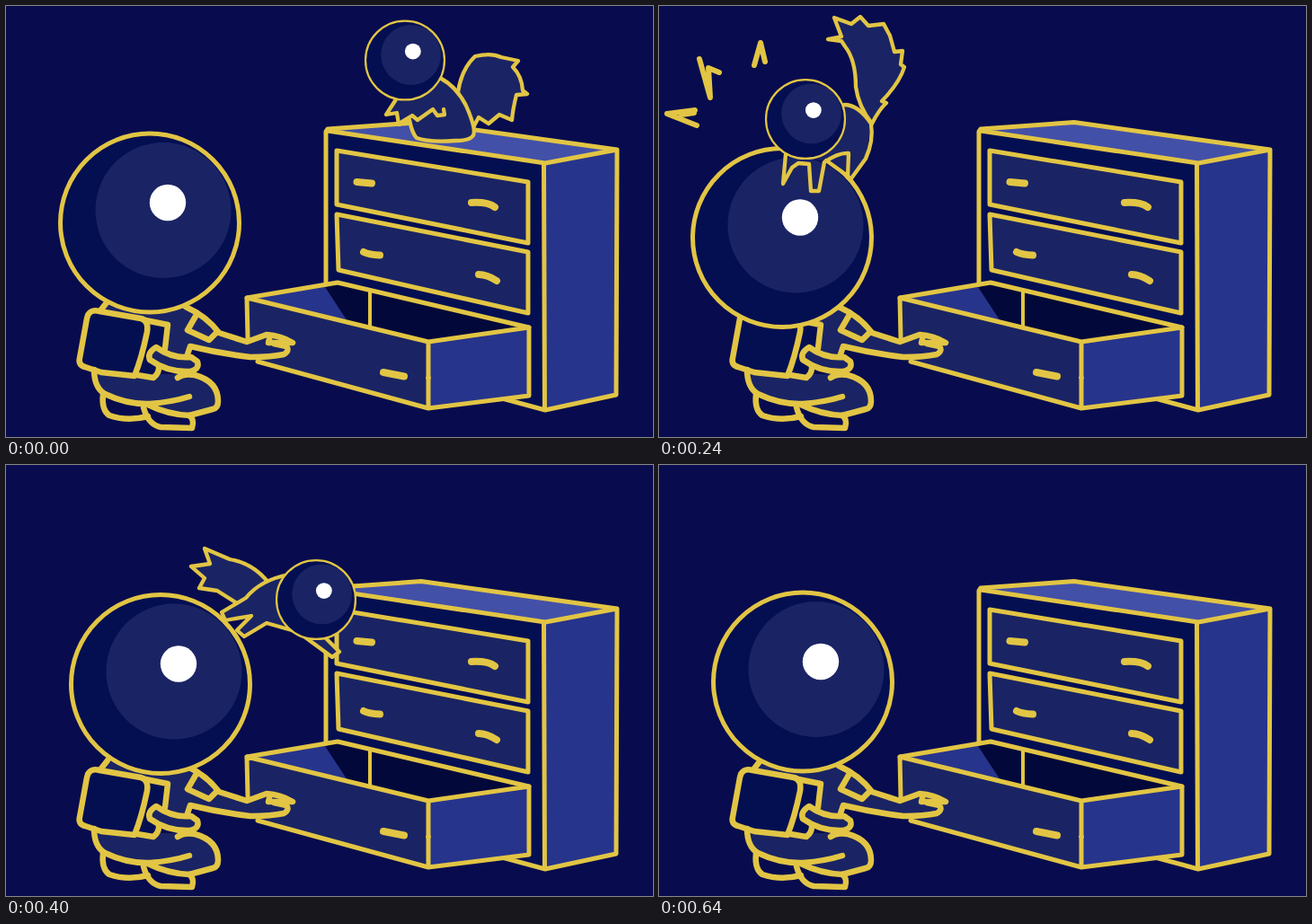
An HTML page that plays this animation: 720x480 px, repeating every 0.72 s.

```html
<!DOCTYPE html>
<html lang="en">
<head>
<meta charset="utf-8">
<title>Squirrel and dresser</title>
<style>
html, body { margin: 0; width: 100%; height: 100%; overflow: hidden; background: #080c4e; }
svg { display: block; width: 720px; height: 480px; }
.line { fill: none; stroke: #e2c544; stroke-linecap: round; stroke-linejoin: round; }
.night { fill: #040f52; }
.mid { fill: #1a2464; }
.side { fill: #27348c; }
.top { fill: #4350a8; }
.dark { fill: #020839; }
</style>
</head>
<body>
<svg viewBox="0 0 720 480">
  <defs>
    <g id="globe">
      <circle class="night" r="99.5"/>
      <circle class="mid" cx="15" cy="-14" r="75.5"/>
      <circle fill="#fff" cx="20" cy="-22.5" r="20.2"/>
      <circle class="line" r="99.5" stroke-width="5"/>
    </g>
  </defs>
  <rect width="720" height="480" fill="#080c4e"/>

  <g id="dresser">
    <path class="night" d="M356 139L600 175V450L552 437L356 400Z"/>
    <path class="top" d="M358 137L462 129L680 160L600 175Z"/>
    <path class="side" d="M599 175L680 160L679 433L600 450Z"/>
    <path class="mid" d="M368 161L581 196V264L368 221ZM368 231L581 274V342L370 294Z"/>
    <path class="side" d="M268 325L356 312L382 352Z"/>
    <path class="dark" d="M355 313L369 308L582 358L470 374L380 351Z"/>
    <g class="line" stroke-width="5">
      <path d="M356 310V140L358 137L462 129.500L680 160L679 433L600 450L552 437M358 139L600 175L680 160M598.500 175L599.500 450"/>
      <path d="M368 161L581 196V264L368 221ZM368 232L581 274V342L370 294Z"/>
      <path d="M268 325L369 308L582 358" />
      <path d="M405 318V357" stroke-width="4"/>
    </g>
    <path class="line" stroke-width="8" d="M390.500 196L407 197.500M518 219Q536 218 544 224M398 274Q404 277 416 277.500M526 299Q535 299 546 306"/>
  </g>

  <g id="inside"></g>

  <g id="drawer">
    <path class="mid" d="M268 325L470 374V448L280 396L269 370Z"/>
    <path class="side" d="M470 374L582 358V434L470 448Z"/>
    <path class="line" stroke-width="5" d="M269 370L268 325L470 374V448L280 396M470 374L582 358V434L470 448M469.500 414H470.500"/>
    <path class="line" stroke-width="8" d="M420 408L443 412.500"/>
  </g>

  <g id="body">
    <path class="mid" d="M112 330L104 341L160 352L180 356L168 384L200 392L205 380L270 390L310 388L316 380L290 367L268 375L237 364Q220 342 200 334Z"/>
    <path class="mid" d="M98 405Q98 425 110 432Q135 444 160 443Q180 455 204 456L230 449Q236 448 236 440Q236 418 210 410L165 410Z"/>
    <path class="night" d="M96 340L82 392Q80 399 88 402L106 408L143 412L165 414Q180 370 180 355Z"/>
    <g class="line" stroke-width="6.500">
      <path d="M113 329L106 338M200 335Q224 346 237 364L268 374L290 366Q306 367 319 375L292 375L293 371M298 376L312 379Q316 384 309 388Q295 391 272 391Q238 387 205 379L201 391"/>
      <path d="M213 342L202 361L226 372L235 363"/>
      <path d="M104 340Q92 337 90 348L82 392Q80 400 88 402L106 408L143 412Q151 392 157 363Q159 350 150 348Z"/>
      <path d="M155 350L180 355L177 381M146 411L164 414Q171 409 170 400"/>
      <path class="mid" d="M167 380Q157 386 160 394Q180 408 204 407Q216 405 213 396L206 391Q185 393 167 380Z"/>
      <path d="M98 405Q98 425 110 432Q135 444 160 443Q185 441 204 435M191 414Q198 409 210 411Q236 418 236 440Q236 448 230 449L204 456Q180 455 158 444"/>
      <path d="M108 432Q106 450 115 456Q135 463 158 457M153 447Q158 466 172 469L207 470Q210 460 204 456"/>
    </g>
  </g>

  <use id="head" href="#globe"/>
  <g id="outside"></g>
  <path id="marks" class="line" stroke-width="6"/>
</svg>
<script>
const STEP = 80, LOOP = 720, REST = [160, 241.5];
const $ = id => document.getElementById(id);

// Parts stack in order: tail, body, line details, face.
const leapTail = "M48 -12Q66 -40 96 -45L124 -57L118 -40L139 -37L124 -24L130 -13L110 -10L88 4L60 8";
const leapBody = "M30 -28Q62 -22 78 -2L105 14L101 23L72 18L88 34L80 41L55 26L20 36L-18 64L-26 58L0 32Z";

const poses = [
  { face: [444, 60.5],
    tail: "M503 96Q507 70 522 56Q540 52 551 57L570 61L564 68Q574 78 575 94L580 98L568 99Q564 115 563 127L549 121L537 131L526 124L519 137",
    body: "M483 80Q505 92 515 118Q523 138 520 144Q517 150 500 150Q470 152 457 147Q452 142 449 127L437 132L435 119L423 121L434 104",
    detail: "M437 131L452 122L458 127L475 115L480 122L488 121L487 115" },
  { face: [296, 72], at: [296, 72], tail: leapTail, body: leapBody },
  { head: [141.5, 249], face: [171.5, 118],
    tail: "M229 116Q232 90 255 65Q275 45 292 40L304 26V54L335 49Q330 60 318 72L320 80L310 86L302 95L295 97L303 100Q290 110 279 117L275 122L254 131",
    body: "M215 117Q228 113 243 118Q255 130 251 155Q248 172 232 186L226 195",
    fill: "M215 117L243 118L251 155L226 196L206 174L153 178L145 152Z",
    detail: "M138 154L150 160L153 178L160 165L177 178L183 170L187 175L203 168L207 174L219 156L217 151M152 178L143 178L133 189L142 193L157 177M177 173L165 195L176 198L189 177M207 173L217 165L226 168L222 180L211 181",
    marks: "M122 91L114 87L111 79Q105 90 95 93L75 93Q80 100 77 122L62 126L51 125Q66 128 69 145L68 164" },
  { head: [137, 258], face: [163, 126],
    tail: "M237 131Q222 112 219 90Q219 60 207 45L203 39L188 37L203 34L195 13L214 20L224 12L233 22L250 20L257 33L262 51L271 50L269 65L273 68Q268 85 248 106L253 108Q245 115 237 131",
    body: "M206 110Q222 110 236 131Q239 150 230 170L214 192",
    fill: "M206 110L222 113L236 131L230 170L213 193L186 173L141 165Z",
    detail: "M141 165L138 198L148 180L155 175L167 176L169 206H178L184 174Q200 163 211 164L210 191M186 172L211 190",
    marks: "M40 116L9 120L42 133M25 121L39 119M45 59L57 102L55 69L67 74M106 66L113 41L118 62" },
  { head: [185, 249], face: [239.5, 72.5],
    tail: "M200 52L170 60L181 71L164 88L182 87L183 96L200 95",
    body: "M282 58Q305 64 311 88Q313 108 307 118L294 132L283 154L264 178L253 168L215 157L189 147L204 130L193 117L207 101",
    fill: "M282 58Q305 64 311 88L294 132L264 178L189 147L207 101Z",
    hollow: true,
    detail: "M282 58Q305 64 311 88Q313 108 307 118L295 131M283 86Q295 95 297 115Q297 130 283 152L264 178M207 101L193 117L201 118L206 130L189 147L197 150L214 135M220 134L205 150L214 153L228 137M233 138L215 157L233 159L246 138M257 137L241 160L252 167L270 136M206 130L222 134L226 117L240 131L250 122L257 133L273 112" },
  { head: [172, 244], face: [345, 150], at: [345, 150], flip: true, tail: leapTail, body: leapBody },
  { face: [427, 289.5], sunk: true,
    body: "M321 201L334 196Q336 215 352 239L378 234L375 190L383 190Q385 218 404 248L462 322Q430 342 397 333Q374 326 366 304L374 300L352 265Q345 232 321 201Z",
    detail: "M352 239L368 264Q378 262 388 265M366 262L368 272L359 275L374 295L367 305M407 339L413 359L425 361L420 337M440 336L455 365L467 363L452 332" },
  { sunk: true,
    tail: "M391 350Q386 318 374 300L361 285L376 285L374 267L389 277L401 262L408 280L421 279L418 296L426 307Q417 328 421 358" },
  {}
];

const stroke = (d, cls = "") => d ? `<path class="line ${cls}" stroke-width="4.300" d="${d}"/>` : "";

function squirrel({ face, at, flip, tail, body, fill, hollow, detail }) {
  const move = at ? ` transform="translate(${at}) scale(${flip ? -1 : 1} 1)"` : "";
  const filled = d => d ? `<path class="mid" d="${d}"/>` : "";
  const coat = fill
    ? filled(fill) + (hollow ? "" : stroke(body))
    : filled(body) + stroke(body);
  const ball = face ? `<use href="#globe" transform="translate(${face}) scale(.442)"/>` : "";
  return `<g${move}>${filled(tail)}${stroke(tail)}${coat}${stroke(detail)}</g>${ball}`;
}

const drawings = poses.map(squirrel);
let shown = -1;

function draw(ms) {
  const i = Math.floor((ms % LOOP) / STEP);
  if (i === shown) return;
  shown = i;
  const pose = poses[i];
  $("head").setAttribute("transform", `translate(${pose.head || REST})`);
  $("inside").innerHTML = pose.sunk ? drawings[i] : "";
  $("outside").innerHTML = pose.sunk ? "" : drawings[i];
  $("marks").setAttribute("d", pose.marks || "");
}

const start = performance.now();
function tick() {
  draw(performance.now() - start);
  requestAnimationFrame(tick);
}
tick();
</script>
</body>
</html>
```
